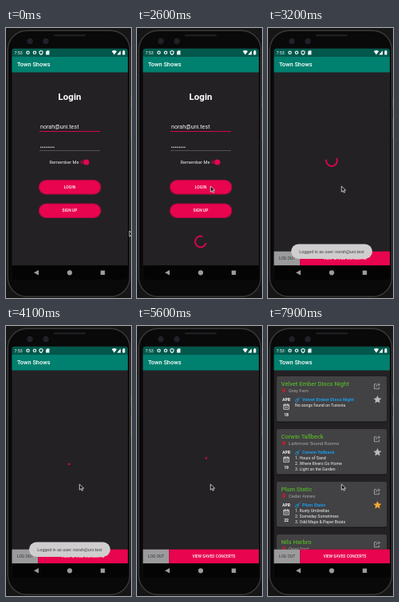
An HTML page that plays this animation: 157x338 px, repeating every 8000 ms.

```html
<!DOCTYPE html>
<html lang="en">
<head>
<meta charset="utf-8">
<title>Concert app login</title>
<style>
html, body { margin: 0; width: 100%; height: 100%; overflow: hidden; background: #161617; }
svg { display: block; width: 157px; height: 338px; font-family: Roboto, "Noto Sans", sans-serif; }
.b { font-weight: 700; }
.m { font-weight: 500; }
.c { text-anchor: middle; }
</style>
</head>
<body>
<svg viewBox="0 0 157 338">
  <defs>
    <clipPath id="screen"><rect x="7.5" y="25.7" width="145.5" height="290" rx="3"/></clipPath>
    <clipPath id="content"><rect x="7.5" y="55.5" width="145.5" height="224.2"/></clipPath>
    <g id="share" fill="none" stroke="#b4b4b4" stroke-width=".8">
      <path d="M-.5-2.6h-3v6h6V1M-1.5 1C-1.2-1 .4-2 3-2M1.6-3.8 3.5-2 1.6-.2"/>
    </g>
    <path id="star" d="M0-5 1.5-1.7 5-1.3 2.4 1.1 3.1 4.6 0 2.8-3.1 4.6-2.4 1.1-5-1.3-1.5-1.7Z"/>
    <g id="pin"><path d="M0 3.2C-1.2 1.2-2 .4-2-.9a2 2 0 0 1 4 0C2 .4 1.2 1.2 0 3.2Z" fill="#c41f35"/><circle cy="-.9" r=".7" fill="#701a28"/></g>
    <g id="calendar" fill="none" stroke="#e6e6e6" stroke-width=".8"><path d="M-3.3-2.7h6.6v6h-6.6zM-3.3-1.2h6.6M-1.7-3.7v1.6M1.7-3.7v1.6M-2 1h4"/></g>
    <g id="guitar" fill="none" stroke="#1596e6" stroke-width=".8"><circle cx="-1.5" cy="1.7" r="1.6"/><circle cx=".1" cy="0" r="1.1"/><path d="M.6-.6 3.2-3.4"/></g>
  </defs>

  <rect x="2.3" y="3.3" width="153.2" height="333" rx="24" fill="#09090a" stroke="#39393b" stroke-width="1.4"/>
  <path d="M156 87v13M156 113v25" stroke="#343437" stroke-width="1.6"/>
  <rect x="60" y="8.2" width="40" height="2" rx="1" fill="#222224"/>
  <g fill="#1a1c22" stroke="#2d2f36" stroke-width=".8"><circle cx="30" cy="16.5" r="3.2"/><circle cx="50" cy="16.5" r="3.2"/></g>
  <g fill="#272a35"><circle cx="30" cy="16.5" r="1.2"/><circle cx="50" cy="16.5" r="1.2"/></g>

  <g clip-path="url(#screen)">
    <rect x="7" y="25" width="147" height="291" fill="#232124"/>

    <g id="login">
      <text class="b c" x="80" y="90" font-size="11.5" fill="#fff">Login</text>
      <text x="43" y="125.5" font-size="7.2" fill="#f2f2f2">norah@uni.test</text>
      <path d="M42 129.5h76" stroke="#d6054c" stroke-width="1"/>
      <g id="dots" fill="#eee"></g>
      <path d="M42 153.5h76" stroke="#757477" stroke-width=".6"/>
      <text x="54.5" y="170" font-size="5.7" fill="#eee">Remember Me</text>
      <rect x="93" y="165.5" width="11" height="4.8" rx="2.4" fill="#74163b"/>
      <circle cx="101" cy="168" r="3.5" fill="#e6044f"/>
      <g fill="#e8044f" stroke="#a90a40" stroke-width="1.2">
        <rect x="41.5" y="190.5" width="77.5" height="17.5" rx="8.75"/>
        <rect x="41.5" y="220" width="77.5" height="17.5" rx="8.75"/>
      </g>
      <g class="m c" font-size="5" fill="#fff"><text x="80" y="201">LOGIN</text><text x="80" y="230.4">SIGN UP</text></g>
    </g>

    <g id="home">
      <g id="list" clip-path="url(#content)"></g>
      <rect x="7" y="279.7" width="33.2" height="18" fill="#9b9b9d"/>
      <rect x="40.2" y="279.7" width="113" height="18" fill="#e8044f"/>
      <text class="c" x="24" y="290.4" font-size="5" fill="#333">LOG OUT</text>
      <text class="m c" x="96.5" y="290.4" font-size="4.9" fill="#fff">VIEW SAVED CONCERTS</text>
    </g>

    <circle id="spin" r="6.9" fill="none" stroke="#d8064b" stroke-width="2" stroke-linecap="square" pathLength="1"/>

    <rect x="7" y="35.5" width="147" height="20" fill="#00806f"/>
    <rect x="7" y="25" width="147" height="10.5" fill="#00584c"/>
    <text class="m" x="14" y="48.3" font-size="7.4" fill="#fff">Town Shows</text>
    <text x="10.5" y="33" font-size="5.3" fill="#fff">7:53</text>
    <g fill="none" stroke="#e8f2f0" stroke-width="1.2">
      <circle cx="27.5" cy="30.8" r="1.7"/><circle cx="36" cy="30.8" r="1.7"/>
      <path d="M44 28.5l2 .8v1.7q0 1.5-2 2.4-2-.9-2-2.4v-1.7z"/>
    </g>
    <path d="M51.5 28.3h3v5.2h-4.4v-3.7z" fill="#e8f2f0"/>
    <path d="M132.8 29.1q3.2-2 6.4 0L136 33.4zM144 28.2v5.2h-4.6zM146.4 28.8h.7v-.7h1.6v.7h.7v4.8h-3z" fill="#fff"/>

    <rect x="7" y="297.2" width="147" height="19" fill="#040404"/>
    <g fill="#9b9b9b"><path d="M35 306.3l6-3.3v6.6z"/><circle cx="80" cy="306.3" r="3.1"/><rect x="118.8" y="303.6" width="5.4" height="5.4"/></g>

    <g id="toast">
      <rect x="29" y="270.5" width="102" height="18.5" rx="9.25" fill="#cfcdce"/>
      <text class="c" x="80" y="281.6" font-size="5.4" fill="#454545">Logged in as user: norah@uni.test</text>
    </g>
  </g>
  <path id="cursor" d="M0 0v7.2l1.8-1.6 1.2 2.6 1.3-.6-1.2-2.5h2.3z" fill="#111" stroke="#e8e8e8" stroke-width=".8"/>
</svg>
<script>
const $ = id => document.getElementById(id);
const LOOP = 8000, HOME = 2885, LIST = 7100;

$('dots').innerHTML = Array.from({ length: 8 }, (_, i) =>
  `<circle cx="${43.9 + i * 2.3}" cy="149.3" r=".75"/>`).join('');

const shows = [
  { name: 'Velvet Ember Disco Night', venue: 'Grey Fern', day: 18, lines: ['No songs found on Tunovia.'] },
  { name: 'Corwin Tallbeck', venue: 'Larkmoor Sound Rooms', day: 19,
    lines: ['1. Hours of Sand', '2. Where Rivers Go Home', '3. Light on the Garden'] },
  { name: 'Plum Static', venue: 'Cedar Annex', day: 22, saved: true,
    lines: ['1. Rusty Umbrellas', '2. Someday Sometimes', '3. Odd Maps & Paper Boats'] },
  { name: 'Nils Harbro', venue: 'Opal Yard', day: 23, lines: [] }
];
const text = (x, y, size, fill, str, cls = '') =>
  `<text x="${x}" y="${y}" font-size="${size}" fill="${fill}" class="${cls}">${String(str).replace('&', '&amp;')}</text>`;
const icon = (id, x, y, fill = '') => `<use href="#${id}" x="${x}" y="${y}" fill="${fill}"/>`;

$('list').innerHTML = shows.map((s, i) => `<g transform="translate(0 ${63 + i * 66})">
  <rect x="11" y="1" width="138" height="57" rx="2" fill="#171618"/>
  <rect x="11" y="0" width="138" height="56.5" rx="2" fill="#424143"/>
  ${text(16.5, 11.7, 7.5, '#55b02a', s.name, 'm')}
  ${icon('pin', 20, 17.9)}${text(26, 20.2, 5.9, '#a9a9a9', s.venue)}
  ${text(23, 30.8, 5, '#fff', 'APR', 'b c')}${icon('calendar', 23, 38)}${text(23, 49.6, 5, '#fff', s.day, 'b c')}
  ${icon('guitar', 37.5, 29)}${text(43, 31, 5.7, '#1a9be8', s.name, 'b')}
  ${s.lines.map((l, n) => text(34, 37.6 + n * 7, 5.2, '#f2f2f2', l)).join('')}
  ${icon('share', 137, 12.3)}${icon('star', 137.5, 29, s.saved ? '#f4a631' : '#b9b9bb')}
</g>`).join('');

const clamp = v => Math.max(0, Math.min(1, v));
const ramp = (t, a, b) => clamp((t - a) / (b - a));
const show = (el, on) => el.setAttribute('visibility', on ? 'visible' : 'hidden');

// cubic-bezier(.4, 0, .2, 1)
function ease(x) {
  let lo = 0, hi = 1, u = x;
  for (let i = 0; i < 18; i++) {
    u = (lo + hi) / 2;
    const bx = 1.2 * u * (1 - u) ** 2 + .6 * u * u * (1 - u) + u ** 3;
    if (bx < x) lo = u; else hi = u;
  }
  return u * u * (3 - 2 * u);
}

// Material indeterminate ring: the head grows, then the tail catches up
function spin(ms, x, y) {
  const phase = ms / 1333 % 1;
  const head = .75 * ease(clamp(phase * 2));
  const tail = .75 * ease(clamp(phase * 2 - 1));
  const len = Math.max(.01, head - tail);
  const turn = (tail + phase / 4) * 360 + ms / 4444 * 720 - 90;
  $('spin').setAttribute('stroke-dasharray', `${len} ${1 - len}`);
  $('spin').setAttribute('transform', `translate(${x} ${y}) rotate(${turn})`);
}

function draw(t) {
  const home = t >= HOME, list = t >= LIST;
  show($('login'), !home);
  show($('home'), home);
  show($('list'), list);
  show($('spin'), t >= 2110 && !list);
  if (home) spin(t - HOME, 80, 166);
  else spin(Math.max(0, t - 2110), 80, 267.5);
  $('toast').setAttribute('opacity', ramp(t, 2900, 3150) * (1 - ramp(t, 4870, 5370)));
  const k = ease(ramp(t, 950, 1700));
  $('cursor').setAttribute('transform', `translate(${155 - 62.7 * k} ${254 - 56 * k})`);
}

// `visibility` on a child would override a hidden parent, so the list is only shown inside home
const start = performance.now();
function tick() {
  draw((performance.now() - start) % LOOP);
  requestAnimationFrame(tick);
}
tick();
</script>
</body>
</html>
```
